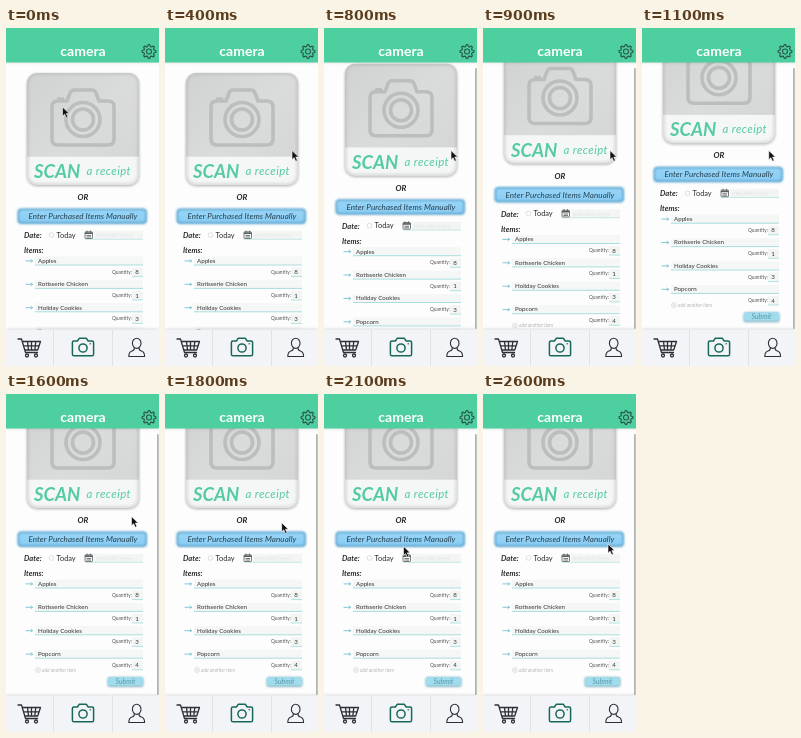
An HTML page for the animation above (2.7 s loop, 153 by 338 pixels).

```html
<!DOCTYPE html>
<html lang="en">
<head>
<meta charset="utf-8">
<title>Receipt camera</title>
<style>
html, body { margin: 0; width: 100%; height: 100%; overflow: hidden; background: #fdfdfd; }
svg { display: block; width: 100vw; height: 100vh; font-family: Lato, "Open Sans", sans-serif; }
.b { font-weight: 700; }
.i { font-style: italic; }
.mid { text-anchor: middle; }
</style>
</head>
<body>
<svg viewBox="0 0 153 338" preserveAspectRatio="none">
  <defs>
    <linearGradient id="photo" x1="0" y1="0" x2="1" y2="1">
      <stop offset="0" stop-color="#d0d1d1"/>
      <stop offset=".5" stop-color="#dadbdb"/>
      <stop offset="1" stop-color="#d3d4d4"/>
    </linearGradient>
    <linearGradient id="blue" x1="0" y1="0" x2="0" y2="1">
      <stop offset="0" stop-color="#97d5f8"/>
      <stop offset="1" stop-color="#8accf3"/>
    </linearGradient>
    <filter id="soft" x="-20%" y="-40%" width="140%" height="200%">
      <feGaussianBlur stdDeviation="1.5"/>
    </filter>
    <filter id="glow" x="-10%" y="-40%" width="120%" height="180%">
      <feGaussianBlur stdDeviation=".8"/>
    </filter>
    <clipPath id="cardClip"><rect x="21" y="45" width="112" height="112" rx="10"/></clipPath>
  </defs>
  <rect width="153" height="338" fill="#fdfdfd"/>

  <g id="page">
    <rect x="21" y="46" width="112" height="112" rx="10" fill="#000" opacity=".32" filter="url(#soft)"/>
    <g clip-path="url(#cardClip)">
      <rect x="21" y="45" width="112" height="112" fill="url(#photo)"/>
      <rect x="21" y="128.7" width="112" height="29" fill="#f5f7f6"/>
      <rect x="21" y="45" width="112" height="112" rx="10" fill="none" stroke="#999" stroke-width="3" opacity=".35" filter="url(#soft)"/>
    </g>
    <g fill="none" stroke="#bcbdbd" stroke-width="3.6" stroke-linejoin="round">
      <path d="M52 73h9l3-8q1-3 4-3h18q3 0 4 3l3 8h9q6 0 6 6v32q0 6-6 6H52q-6 0-6-6V79q0-6 6-6z"/>
      <circle cx="77" cy="91.5" r="17"/>
      <circle cx="77" cy="91.5" r="10.5"/>
      <path d="M51 70.5h7" stroke-width="2.4"/>
    </g>
    <g fill="#55cba1" class="i">
      <text x="28" y="150" font-size="18.5" class="b">SCAN</text>
      <text x="80.5" y="147" font-size="11.4" letter-spacing=".42">a receipt</text>
    </g>

    <text x="77" y="172" font-size="8" class="b i mid" fill="#222">OR</text>
    <rect x="11.5" y="180.5" width="129.5" height="15.5" rx="4" fill="#5aa3cc" filter="url(#glow)"/>
    <rect x="13" y="182" width="126.5" height="12.3" rx="3" fill="url(#blue)" filter="url(#glow)"/>
    <text x="77" y="191" font-size="8" letter-spacing=".08" class="i mid" fill="#24404f">Enter Purchased Items Manually</text>

    <g fill="#2b2b2b">
      <text x="18" y="210" font-size="7.6" class="b i">Date:</text>
      <text x="50.5" y="209.5" font-size="7.4">Today</text>
      <text x="18" y="225" font-size="7.6" class="b i">Items:</text>
    </g>
    <circle cx="45.5" cy="207" r="2.3" fill="#fff" stroke="#ccd1d3" stroke-width=".7"/>
    <rect x="88" y="203" width="49" height="8" fill="#f3f4f4"/>
    <text x="90" y="209" font-size="6.5" fill="#e2e5e5">mm/dd/yyyy</text>
    <path d="M79 211.3H137" stroke="#a9e0da" stroke-width=".7"/>
    <g stroke="#555b5e" stroke-width=".8" fill="none">
      <rect x="79" y="203.8" width="7.5" height="6.7" rx=".7" fill="#f7f7f7"/>
      <path d="M79 205.2h7.5" stroke-width="1.6"/>
      <path d="M81 202.6v2M84.5 202.6v2M80.5 207.5h4.5M80.5 209h4.5"/>
    </g>

    <g id="items"></g>

    <circle cx="32" cy="319" r="2.5" fill="none" stroke="#c3c7c8" stroke-width=".5"/>
    <path d="M30.6 319h2.8M32 317.6v2.8" stroke="#c3c7c8" stroke-width=".5"/>
    <text x="36" y="320.7" font-size="4.8" class="i" fill="#b4b8b9">add another item</text>
    <rect x="101.5" y="326" width="36" height="10" rx="2.5" fill="#5f9db5" opacity=".7" filter="url(#glow)"/>
    <rect x="102" y="326" width="35" height="8.6" rx="2.2" fill="#a1dcec"/>
    <text x="119.5" y="332.8" font-size="6.8" class="i mid" fill="#5899ab">Submit</text>
  </g>

  <rect id="bar" x="151" y="40" width="1.8" height="261" rx=".9" fill="#808484" opacity=".6"/>

  <rect y="1" width="153" height="34" fill="#000" opacity=".12" filter="url(#soft)"/>
  <rect width="153" height="34.5" fill="#4dcf9f"/>
  <text x="77" y="27.6" font-size="14" class="b mid" fill="#fff">camera</text>
  <g fill="none" stroke="#2a594d">
    <path id="gear" stroke-width="1.2" stroke-linejoin="round"/>
    <circle cx="143" cy="23.5" r="2.5" stroke-width="1.1"/>
  </g>

  <rect y="301" width="153" height="37" fill="#000" opacity=".16" filter="url(#soft)"/>
  <rect y="301.5" width="153" height="36.5" fill="#f2f4f7"/>
  <path d="M47.5 302V338M106.5 302V338" stroke="#dce0e3" stroke-width=".8"/>
  <g fill="none" stroke="#2b3034" stroke-width="1.3" stroke-linejoin="round" stroke-linecap="round">
    <path d="M12 311h3.5l4 13.5h12M16.4 313.5h18.1l-2.8 8.5H18.8M17.6 317.8h15.2M21.5 313.5l1 8.5M25.5 313.5v8.5M29.8 313.5l-1 8.5"/>
    <circle cx="21" cy="327.5" r="1.5"/>
    <circle cx="30" cy="327.5" r="1.5"/>
    <g stroke-width="1.1">
      <ellipse cx="130.7" cy="315.3" rx="4.3" ry="5.1"/>
      <path d="M128.3 320q.3 2.3-2.3 3q-3.2.9-3.2 5.5h15.8q0-4.6-3.2-5.5q-2.6-.7-2.3-3"/>
    </g>
  </g>
  <g fill="none" stroke="#17685a" stroke-width="1.5" stroke-linejoin="round">
    <path d="M68 313h3.4l1.8-2.7h7.2l1.8 2.7h3.8q1.6 0 1.6 1.6v11.6q0 1.6-1.6 1.6H68q-1.6 0-1.6-1.6v-11.6q0-1.6 1.6-1.6z"/>
    <circle cx="77" cy="320" r="4.1"/>
    <path d="M83.5 315.8h1.6" stroke-width="1.1"/>
  </g>

  <path id="cursor" d="M0 0V9.2L2.1 7.2L3.7 10.8L5.4 10L3.8 6.6H6.7z" fill="#111" stroke="#fff" stroke-width=".6"/>
</svg>

<script>
const LOOP = 2700, STEP = 100, SCROLL = 43;
const $ = id => document.getElementById(id);
const list = [["Apples", 8], ["Rotisserie Chicken", 1], ["Holiday Cookies", 3], ["Popcorn", 4]];

$("items").innerHTML = list.map(([name, count], n) => `
  <g transform="translate(0 ${n * 23.4})">
    <path d="M19.5 232.9h7M24.8 231.5l1.9 1.4l-1.9 1.4" fill="none" stroke="#62bccd" stroke-width=".8"/>
    <rect x="29" y="228.5" width="108" height="8.2" fill="#f5f6f6"/>
    <text x="32" y="234.8" font-size="6.2" fill="#333">${name}</text>
    <path d="M29 237H137" stroke="#93d6d4" stroke-width=".8"/>
    <text x="106" y="245.5" font-size="4.8" fill="#555">Quantity:</text>
    <rect x="126" y="239.5" width="11" height="8.8" fill="#f3f5f5"/>
    <text x="131" y="246.2" font-size="6.2" class="mid" fill="#333">${count}</text>
    <path d="M126 248.6H137" stroke="#93d6d4" stroke-width=".7"/>
  </g>`).join("");

// Eight teeth, four corners each
$("gear").setAttribute("d", "M" + Array.from({ length: 32 }, (_, k) => {
  const a = (k - 0.5) * Math.PI / 16, r = k % 4 < 2 ? 6.9 : 5.2;
  return (143 + r * Math.cos(a)).toFixed(2) + " " + (23.5 + r * Math.sin(a)).toFixed(2);
}).join("L") + "z");

// time, x, y of the pointer tip
const path = [
  [0, 56.5, 79], [100, 66, 85], [300, 117, 117], [400, 127, 122.5], [1000, 127, 122.5],
  [1600, 125.5, 122.5], [1750, 124, 124], [2050, 80, 152], [2150, 79, 152.5],
  [2300, 92, 152], [2500, 122, 150], [2600, 125, 150]
];

const smooth = u => u * u * (3 - 2 * u);
const clamp = u => Math.max(0, Math.min(1, u));

function pointerAt(t) {
  const k = path.findIndex(p => p[0] > t);
  if (k < 0) return path[path.length - 1].slice(1);
  const a = path[k - 1], b = path[k], u = (t - a[0]) / (b[0] - a[0]);
  return [a[1] + (b[1] - a[1]) * u, a[2] + (b[2] - a[2]) * u];
}

function draw(t) {
  const y = SCROLL * smooth(clamp((t - 650) / 500));
  const [px, py] = pointerAt(t);
  $("page").setAttribute("transform", `translate(0 ${-y})`);
  $("bar").setAttribute("visibility", y > 0 ? "visible" : "hidden");
  $("cursor").setAttribute("transform", `translate(${px} ${py})`);
}

const start = performance.now();
function tick() {
  const t = (performance.now() - start) % LOOP;
  draw(Math.floor(t / STEP) * STEP);
  requestAnimationFrame(tick);
}
tick();
</script>
</body>
</html>
```
